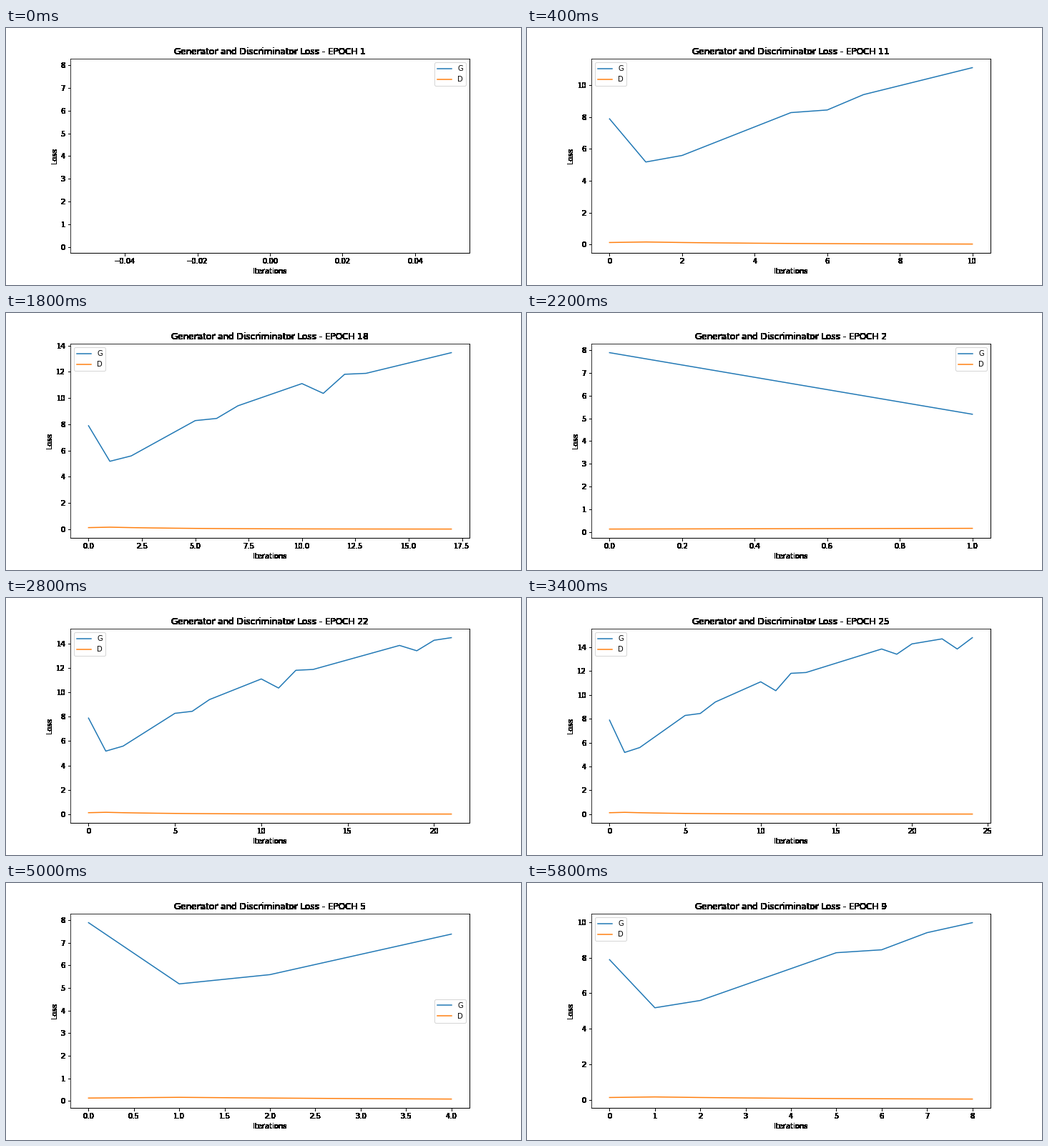
Animation, 720 px wide and 360 px high, one loop 6 s. Source, as a matplotlib script:

```python
import matplotlib.pyplot as plt
import numpy as np
from matplotlib.animation import FuncAnimation

N = 30

# Epochs play in alphabetical order: 1, 10, 11, ... 19, 2, 20, ...
EPOCHS = sorted(range(1, N + 1), key=str)

TREND = [(1, 5.18), (2, 5.59), (5, 8.28), (10, 11.1), (12, 11.81),
         (13, 11.88), (18, 13.85), (22, 14.7), (29, 15.05)]
JUMPS = {0: 2.71, 6: -0.4, 11: -1.1, 19: -0.65, 23: -0.9, 25: 0.35}

steps = np.arange(N)
g_loss = np.interp(steps, *zip(*TREND))
for step, jump in JUMPS.items():
    g_loss[step] += jump
d_loss = 0.015 + 0.145 * np.exp(-abs(steps - 1) / 4)

plt.rcParams.update({
    "font.family": "DejaVu Sans",
    "font.size": 10,
    "figure.subplot.left": 0.125,
    "figure.subplot.right": 0.9,
    "figure.subplot.bottom": 0.125,
    "figure.subplot.top": 0.88,
})


def drop_alpha(im, dpi):
    """Make every touched pixel opaque, so text off the panel has hard edges."""
    out = im.copy()
    out[..., 3] = im[..., 3] > 0
    return out, 0, 0


fig, ax = plt.subplots(figsize=(10, 5), dpi=72)


def draw(i):
    epoch = EPOCHS[i]
    ax.clear()
    ax.set_agg_filter(drop_alpha)
    ax.plot(g_loss[:epoch], label="G")
    ax.plot(d_loss[:epoch], label="D")
    ax.set_title(f"Generator and Discriminator Loss - EPOCH {epoch}")
    ax.set_xlabel("Iterations")
    ax.set_ylabel("Loss")
    ax.legend(loc="best")
    return []


anim = FuncAnimation(fig, draw, frames=N, interval=200,
                     repeat=True, repeat_delay=0, blit=False)
plt.show()
```
